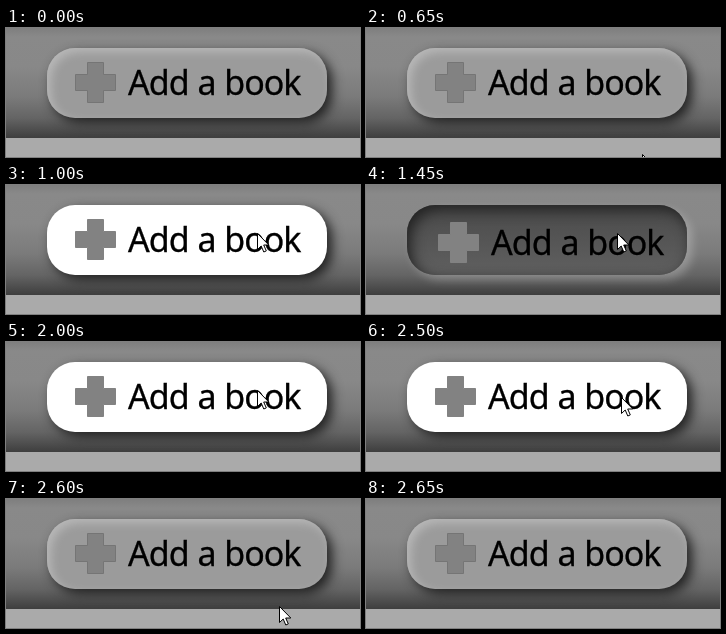
An HTML page for the animation above (3250 ms loop, 354 px wide and 129 px high).

```html
<!DOCTYPE html>
<html lang="en">
<head>
<meta charset="utf-8">
<style>
html, body { margin: 0; width: 100%; height: 100%; overflow: hidden; background: #aaa; }
#bar {
  position: absolute; left: 0; top: 0; width: 354px; height: 110px;
  background: linear-gradient(#7e7e7e, #898989 8%, #888 35%, #7b7b7b 62%, #646464 82%, #3e3e3e);
}
#button {
  position: absolute; left: 41px; top: 20px; width: 280px; height: 70px; border-radius: 28px;
  background: #9b9b9b;
  box-shadow: 5px 5px 12px #222, inset 4px 4px 10px #b8b8b8;
}
#button.hover { background: #fff; box-shadow: 5px 5px 12px #222; }
#button.down {
  background: linear-gradient(#4a4a4a, #606060);
  box-shadow: 5px 5px 10px rgba(255, 255, 255, .26), inset 4px 5px 14px #222;
}
svg { position: absolute; left: 0; top: 0; }
text {
  font: 34px "Noto Sans", "Open Sans", sans-serif; letter-spacing: -1px; word-spacing: 1px;
  stroke: #000; stroke-width: .3px;
}
#plus { fill: #828282; }
</style>
</head>
<body>
<div id="bar"></div>
<div id="button"></div>
<svg width="354" height="129">
  <g id="label">
    <path id="plus" d="M81.5 34.5h16v12h12v16h-12v12h-16v-12h-12v-16h12z"/>
    <text x="122" y="67">Add a book</text>
  </g>
  <path id="cursor" d="M.5.5v16l3.7-3.5 2.6 6 2.5-1.1-2.6-5.9h5.1z" fill="#fff" stroke="#000"/>
</svg>
<script>
const [button, label, plus, cursor] =
  ['button', 'label', 'plus', 'cursor'].map(id => document.getElementById(id));
const LOOP = 3250, STEP = 50, REST = [251, 48];
const mix = (a, b, u) => a.map((v, i) => Math.round(v + (b[i] - v) * u));

// Pointer position, or null while it is off the stage
function pointer(t) {
  if (t < 650 || t >= 2650) return null;
  if (t < 1000) return mix([276, 126], REST, 1 - (1 - (t - 650) / 350) ** 1.4);
  if (t < 2500) return REST;
  return mix([255, 55], [273, 107], (t - 2500) / 100);
}

function draw(now) {
  const t = Math.floor(now % LOOP / STEP) * STEP;
  const pos = pointer(t);
  const down = t >= 1450 && t < 2000;
  const hover = pos && pos[1] < 90;
  button.className = down ? 'down' : hover ? 'hover' : '';
  label.setAttribute('transform', down ? 'translate(3 3)' : '');
  plus.setAttribute('stroke', hover ? '#828282' : '#757575');
  cursor.style.display = pos ? '' : 'none';
  if (pos) cursor.setAttribute('transform', `translate(${pos})`);
}

const start = performance.now();
function tick() {
  draw(performance.now() - start);
  requestAnimationFrame(tick);
}
tick();
</script>
</body>
</html>
```
